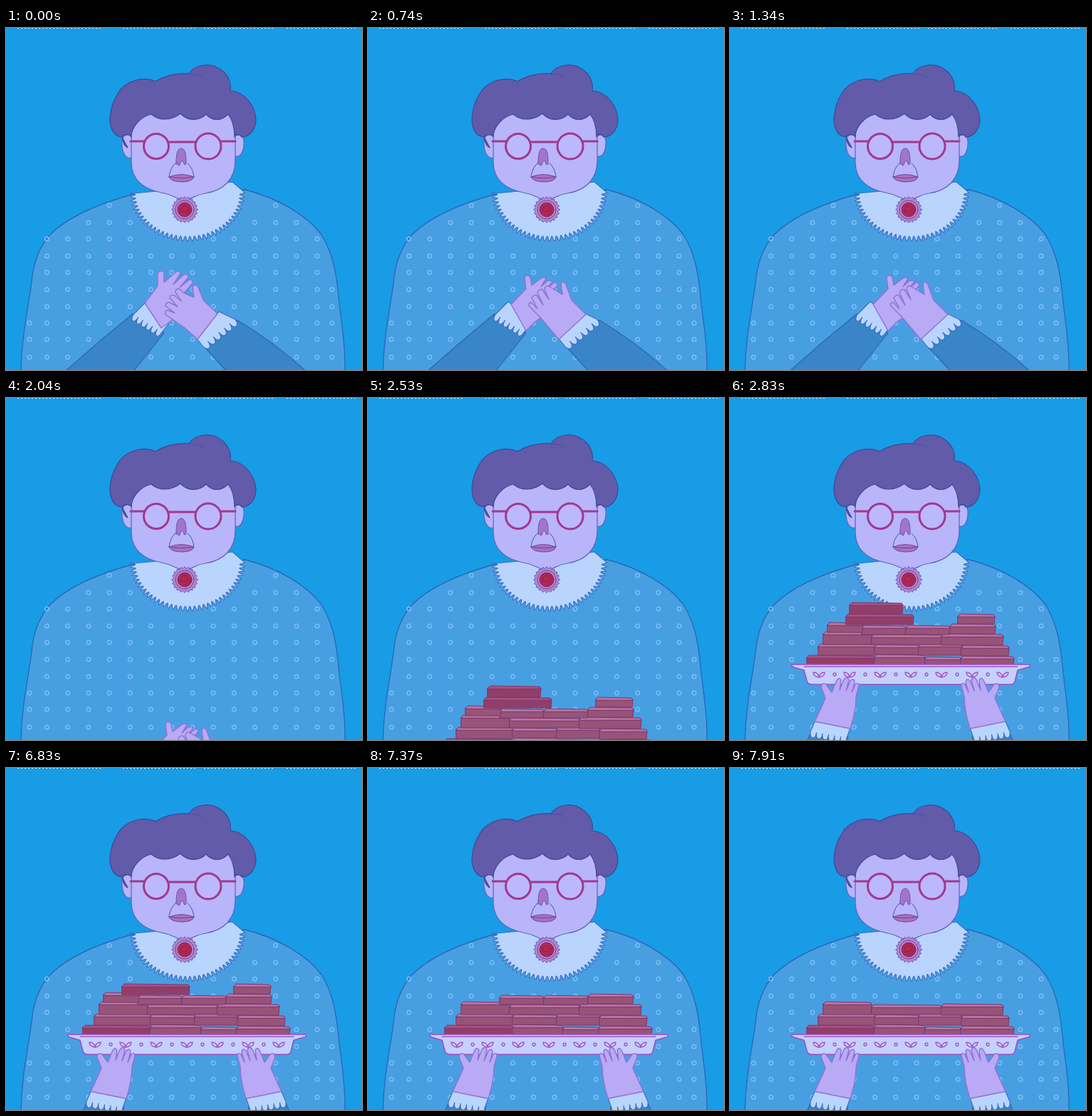
These frames come from a looping animation (500 px wide and 480 px high, 8 s). An HTML page:

```html
<!DOCTYPE html>
<html lang="en">
<head>
<meta charset="utf-8">
<title>Tray of brownies</title>
<style>
html, body { margin: 0; width: 100%; height: 100%; overflow: hidden; background: #189ce6; }
svg { display: block; width: 100vw; height: 100vh; }
svg * { stroke-linejoin: round; stroke-linecap: round; }

.line { fill: none; stroke: #4a4fa8; }
.skin { fill: #b9b5fa; stroke: #5b62bd; stroke-width: 1.2; }
.hand { fill: #b8aaf4; stroke: #9270d4; stroke-width: 1.4; }
.cloth { fill: #479fe2; stroke: #2c66b4; stroke-width: 1.3; }
.sleeve { fill: #3985c7; stroke: #2c66b4; stroke-width: 1.2; }
.lace { fill: #b9d5fd; stroke: #3b6fc0; stroke-width: 1.2; }
.hair { fill: #615ba9; stroke: #3f4796; stroke-width: 1.2; }
.glasses { fill: #bcb8fd; stroke: #a0398f; stroke-width: 3; }
.china { fill: #c5d0fd; stroke: #9c50c4; stroke-width: 1.5; }
.motif { fill: none; stroke: #a650c0; stroke-width: 1.3; }
#dots circle { fill: none; stroke: #7fbef4; stroke-width: 1.4; }
.brick { stroke: #81346f; stroke-width: 1; }

.left {
  --a: path("M195 386 L213 362 L213 345 Q216 338 222 343 L222 357 L238 343 Q243 339 245 344 L235 360 L250 346 Q256 345 256 350 L244 364 L258 353 Q263 354 262 358 L250 372 L260 400 L233 410 L218 421 Z");
  --b: path("M201 388 L222 366 L220 350 Q223 344 228 350 L230 361 L242 352 Q247 348 250 352 L243 363 L252 355 Q257 353 259 356 L250 367 L262 357 Q266 358 266 361 L256 373 L250 402 L235 412 L222 425 Z");
}
.right {
  --a: path("M297 401 L277 382 L270 364 Q265 357 262 364 L264 378 L250 372 L243 366 Q238 366 238 371 L246 383 L236 375 Q230 374 230 379 L241 391 L229 385 Q224 386 224 390 L237 400 L227 396 Q221 398 225 403 L250 420 L269 437 Z");
  --b: path("M306 402 L286 382 L278 360 Q273 352 271 360 L273 374 L260 366 L253 362 Q248 362 248 367 L254 381 L245 367 Q240 366 238 371 L246 389 L237 375 Q232 374 230 379 L238 394 L229 385 Q225 386 226 390 L240 404 L268 437 Z");
}
.left, .right { d: var(--a); animation: wring 8s infinite; }
#clasped { animation: lower 8s infinite; }
#serving { animation: raise 8s infinite; }

@keyframes wring {
  0% { d: var(--a); animation-timing-function: step-end; }
  6.25% { d: var(--a); animation-timing-function: steps(3, start); }
  10.75% { d: var(--b); animation-timing-function: steps(3, start); }
  15.25% { d: var(--a); animation-timing-function: steps(2, start); }
  18.25%, 100% { d: var(--b); }
}
@keyframes lower {
  0% { transform: translate(0, 0); animation-timing-function: step-end; }
  18.25% { transform: translate(4px, 0); animation-timing-function: step-end; }
  22% { transform: translate(4px, 0); animation-timing-function: steps(7, start); }
  28.125%, 100% { transform: translate(4px, 150px); }
}
@keyframes raise {
  0% { transform: translateY(195px); }
  29.75% { transform: translateY(195px); animation-timing-function: steps(10, start); }
  36%, 100% { transform: translateY(0); }
}
</style>
</head>
<body>
<svg viewBox="0 0 500 480" preserveAspectRatio="none">
  <rect width="500" height="480" fill="#189ce6"/>
  <path d="M16 .5H134M164 .5H266M278 .5H376M394 .5H492" stroke="#d9f0ff" stroke-dasharray="2 3" style="stroke-linecap:butt"/>

  <path class="cloth" d="M176 234C140 244 90 262 62 290C44 310 38 334 36 356C32 390 22 430 21 482H476C477 440 470 410 467 376C464 344 459 316 443 290C422 262 380 238 336 227Z"/>
  <g id="dots"></g>
  <path id="collar" class="lace"/>

  <g id="head">
    <path class="skin" d="M177 152C166 146 162 154 163 165C164 177 169 184 177 182ZM321 152C331 146 335 154 334 164C333 175 329 182 321 180Z"/>
    <path class="skin" d="M176 135V190C177 213 193 226 218 231C236 234 240 241 251 241C262 241 264 234 280 232C306 228 322 212 322 186V130L300 110H200Z"/>
    <path class="hair" d="M171 168C163 164 164 155 163 153C150 152 146 139 146 127C147 112 151 101 157 92C167 74 192 67 210 75C224 66 241 63 257 64C265 51 285 49 298 56C311 63 317 76 315 88C336 89 351 111 351 130C350 144 341 153 331 153C328 148 322 149 321 153C321 140 318 129 312 121C302 131 290 131 281 121C271 131 255 131 245 120C232 130 216 131 204 121C188 125 176 139 176 153C172 147 164 150 163 153Z"/>
    <path class="line" d="M257 65C265 64 272 66 276 69"/>
    <g class="glasses">
      <path d="M175 159H195M229 160H266M302 159H322"/>
      <circle cx="211" cy="166" r="17.5"/>
      <circle cx="284" cy="166" r="18"/>
    </g>
    <path class="line" d="M238 190C232 195 230 202 229 209M255 190C261 195 263 202 264 209"/>
    <path d="M239 188C239 174 242 169 246 169C251 169 253 176 253 187Q253 194 250 191L249 187Q246 185 245 189Q243 197 241 190Q238 194 239 188Z" fill="#a275cb" stroke="#6653b2"/>
    <path d="M229 209Q246 202 264 209Q262 216 247 216Q232 216 229 209Z" fill="#ad6fbd" stroke="#624aa5"/>
    <path class="line" d="M230 209Q246 212 263 209"/>
  </g>

  <g id="brooch">
    <path id="frill" fill="#a98ad8" stroke="#7c4aa8"/>
    <circle cx="251" cy="255" r="13" fill="#b889c9" stroke="#85398f"/>
    <circle cx="251" cy="255" r="10" fill="#b2274f" stroke="#7d246c"/>
    <path d="M245 259Q244 249 252 249Q258 249 255 255Q252 260 247 257M253 262Q259 259 258 254" fill="none" stroke="#7d246c"/>
  </g>

  <g id="clasped">
    <path class="sleeve" d="M83 482Q130 440 178 401L222 428L179 482Z"/>
    <path class="sleeve" d="M422 482Q375 440 325 410L277 446L310 482Z"/>
    <path class="lace" data-cuff="197 384 232 410 219 427 179 402"/>
    <path class="hand left"/>
    <path class="lace" data-cuff="299 398 268 436 276 446 322 409"/>
    <path class="hand right"/>
  </g>

  <g id="serving">
    <g id="bricks"></g>
    <path class="china" d="M87 374H421Q423 377 418 378L404 382L400 398Q399 402 394 402H115Q109 402 108 397L104 382L90 378Q85 376 87 374Z"/>
    <path class="motif" d="M104 377H404"/>
    <g id="motifs" class="motif"></g>
    <g id="arm">
      <path class="sleeve" d="M108 482L114 468L166 476L164 482Z"/>
      <path class="lace" data-cuff="120 452 169 463 164 477 113 468"/>
      <path class="hand" d="M119 454C126 440 131 428 134 421L128 406Q129 398 135 402L143 413L149 398Q153 390 156 396L154 410L160 395Q165 389 167 396L163 411L169 397Q174 392 175 399L171 413L176 402Q181 398 181 404L177 419C177 437 173 450 169 464Z"/>
    </g>
    <use href="#arm" transform="translate(506 0) scale(-1 1)"/>
  </g>
</svg>
<script>
const $ = id => document.getElementById(id);

function add(parent, tag, attrs) {
  const node = document.createElementNS('http://www.w3.org/2000/svg', tag);
  for (const key in attrs) node.setAttribute(key, attrs[key]);
  return parent.appendChild(node);
}

// Wavy arc: an ellipse whose radius swings by `depth`, `teeth` times over the span.
function wavyArc(cx, cy, rx, ry, span, teeth, depth) {
  const count = teeth * 8;
  return Array.from({ length: count + 1 }, (_, i) => {
    const angle = span * i / count;
    const swing = depth * Math.cos(2 * Math.PI * teeth * i / count);
    const x = cx + (rx + swing) * Math.cos(angle);
    const y = cy + (ry + swing) * Math.sin(angle);
    return x.toFixed(1) + ' ' + y.toFixed(1);
  }).join('L');
}

$('collar').setAttribute('d', 'M' + wavyArc(255, 231, 77, 65, Math.PI, 36, 3.6) + 'L180 232Q250 226 318 216Z');
$('frill').setAttribute('d', 'M' + wavyArc(251, 255, 17, 17, 2 * Math.PI, 20, 1.2) + 'Z');

// Polka dots: [y, first column, last column]
const dotRows = [
  [249, 3, 3], [249, 11, 11], [273, 2, 4], [273, 10, 12], [296, 0, 4], [296, 8, 13],
  [320, 0, 13], [343, 0, 13], [367, 0, 14], [391, 0, 14], [414, -1, 14], [437, -1, 14], [462, -1, 14]
];
for (const [y, first, last] of dotRows)
  for (let col = first; col <= last; col++)
    add($('dots'), 'circle', { cx: Math.min(458, Math.max(33, 57.5 + 29.2 * col)), cy: y, r: 2.8 });

// Cuffs: wrist edge, then the edge that carries the teeth
for (const cuff of document.querySelectorAll('[data-cuff]')) {
  const [ax, ay, bx, by, cx, cy, dx, dy] = cuff.dataset.cuff.split(' ').map(Number);
  const teeth = 6, stepX = (dx - cx) / teeth, stepY = (dy - cy) / teeth;
  const length = Math.hypot(stepX, stepY);
  const side = Math.sign((cx - bx) * -stepY + (cy - by) * stepX) * 11 / length;
  const outX = -stepY * side, outY = stepX * side;
  let d = `M${ax} ${ay}L${bx} ${by}L${cx} ${cy}`;
  for (let i = 0; i < teeth; i++)
    d += `c${outX} ${outY} ${stepX + outX} ${stepY + outY} ${stepX} ${stepY}`;
  cuff.setAttribute('d', d + 'Z');
}

for (let i = 0; i < 7; i++) {
  const x = 125 + 43 * i;
  add($('motifs'), 'path', { d: `M${x} 392q-8 -1 -8 -7q7 0 8 7q1 -7 8 -7q0 6 -8 7` });
  if (i < 6) add($('motifs'), 'circle', { cx: x + 22, cy: 388, r: 2 });
}

// Brownies from the bottom up: [left, right, top, bottom, dark]
const bricks = [
  [108, 203, 361, 375, 1], [203, 274, 360, 375], [274, 325, 363, 375], [324, 399, 362, 375],
  [124, 204, 345, 361], [203, 266, 346, 360], [265, 326, 345, 361], [325, 392, 347, 362],
  [131, 199, 328, 346], [199, 298, 332, 346], [297, 384, 331, 347],
  [309, 373, 317, 331], [247, 309, 319, 332], [185, 247, 319, 332], [137, 187, 315, 329],
  [320, 372, 303, 317], [163, 258, 303, 318, 1], [168, 243, 287, 303, 1]
];
const style = document.head.appendChild(document.createElement('style'));
bricks.forEach(([left, right, top, bottom, dark], i) => {
  const brick = add($('bricks'), 'g', { class: 'brick' });
  add(brick, 'path', {
    d: `M${left} ${top + 3}H${right}L${right - 1} ${bottom}H${left}Z`,
    fill: dark ? '#913f68' : '#965478'
  });
  add(brick, 'path', {
    d: `M${left} ${top + 4}L${left + 3} ${top}L${right - 2} ${top + 1}L${right} ${top + 4}Z`,
    fill: dark ? '#a65180' : '#b9759f'
  });
  const order = bricks.length - 1 - i;
  if (order > 6) return;
  const vanish = (6830 + 180 * order) / 80;
  style.textContent += `@keyframes eat${order} { 0% { opacity: 1 } ${vanish}%, 100% { opacity: 0 } }\n`;
  brick.style.animation = `eat${order} 8s step-end infinite`;
});
</script>
</body>
</html>
```
